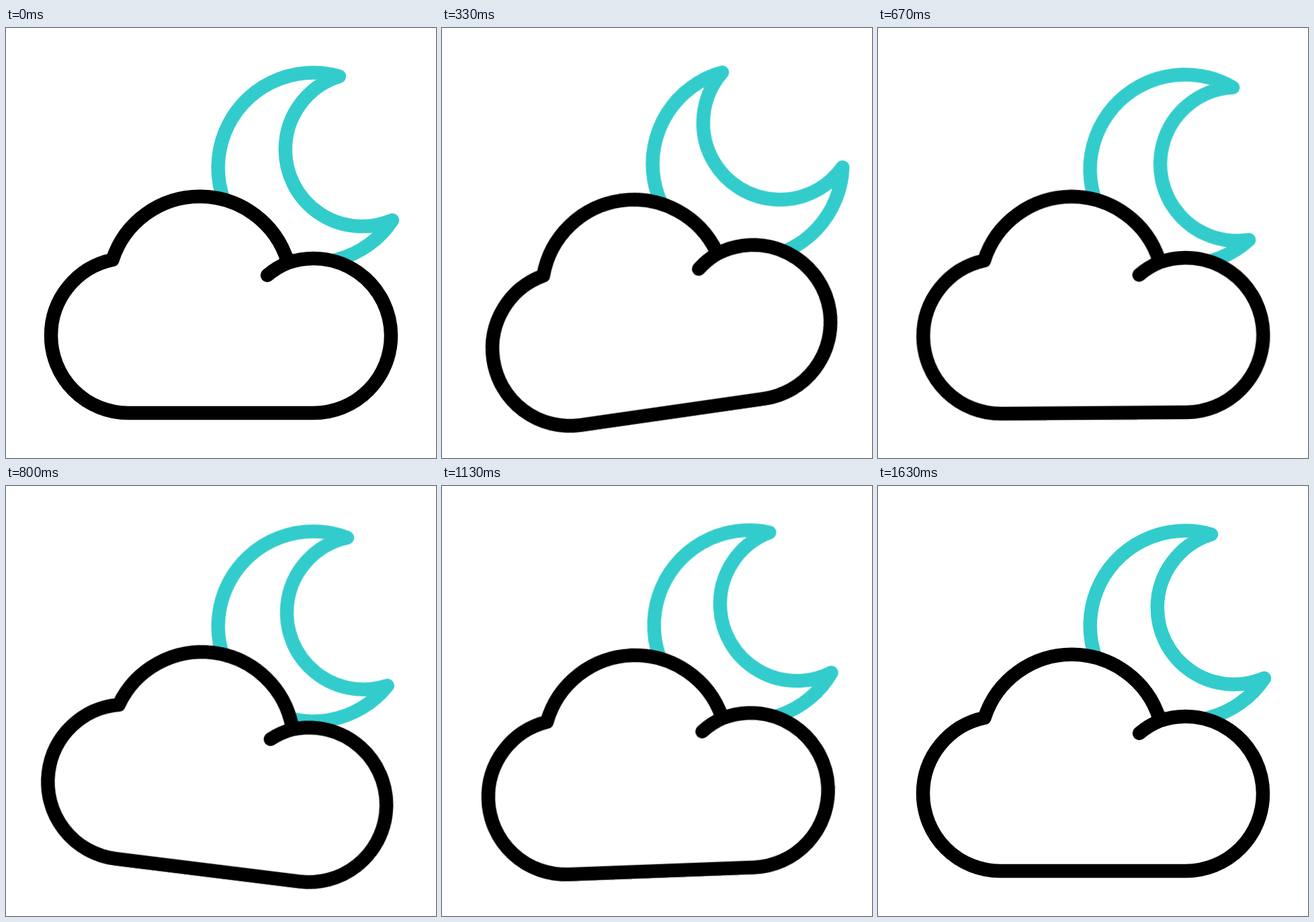
An HTML page that plays this animation: 640 by 640 pixels, repeating every 1670 ms.

```html
<!DOCTYPE html>
<html lang="en">
<head>
<meta charset="utf-8">
<title>Cloudy night</title>
<style>
  html, body {
    margin: 0;
    width: 100%;
    height: 100%;
    overflow: hidden;
    background: #fff;
  }
  svg {
    display: block;
    width: 100%;
    height: 100%;
  }
  path {
    fill: #fff;
    stroke-width: 20.5;
    stroke-linecap: round;
    stroke-linejoin: round;
    animation: 1670ms cubic-bezier(.333, 0, .667, 1) infinite;
  }
  .moon {
    stroke: #3cc;
    transform-origin: 446px 209px;
    animation-name: sway;
  }
  .cloud {
    stroke: #000;
    transform-origin: 320px 411px;
    animation-name: rock;
  }
  @keyframes sway {
    0%, 4%   { transform: rotate(0deg); }
    19.4%    { transform: rotate(-31.6deg); }
    37.3%    { transform: rotate(15.2deg); }
    60.1%    { transform: rotate(-7.25deg); }
    79.8%    { transform: rotate(3.7deg); }
    97.6%, 100% { transform: rotate(0deg); }
  }
  @keyframes rock {
    0%, 10%  { transform: rotate(0deg); }
    29.1%    { transform: rotate(-15.7deg); }
    47.1%    { transform: rotate(7.1deg); }
    71.5%    { transform: rotate(-2.8deg); }
    87.8%, 100% { transform: rotate(0deg); }
  }
</style>
</head>
<body>
<svg viewBox="0 0 640 640">
  <path class="moon" d="M496 72A141.4 141.4 0 1 0 575 286A114.2 114.2 0 0 1 415.8 181A114.2 114.2 0 0 1 496 72Z"/>
  <path class="cloud" d="M389 368Q403 356 419 349.7A115.2 115.2 0 0 1 573 457.8A115.2 115.2 0 0 1 458 573H182A115.2 115.2 0 0 1 67 457.8A115.2 115.2 0 0 1 158.5 345A136.7 136.7 0 0 1 419 347"/>
</svg>
</body>
</html>
```
